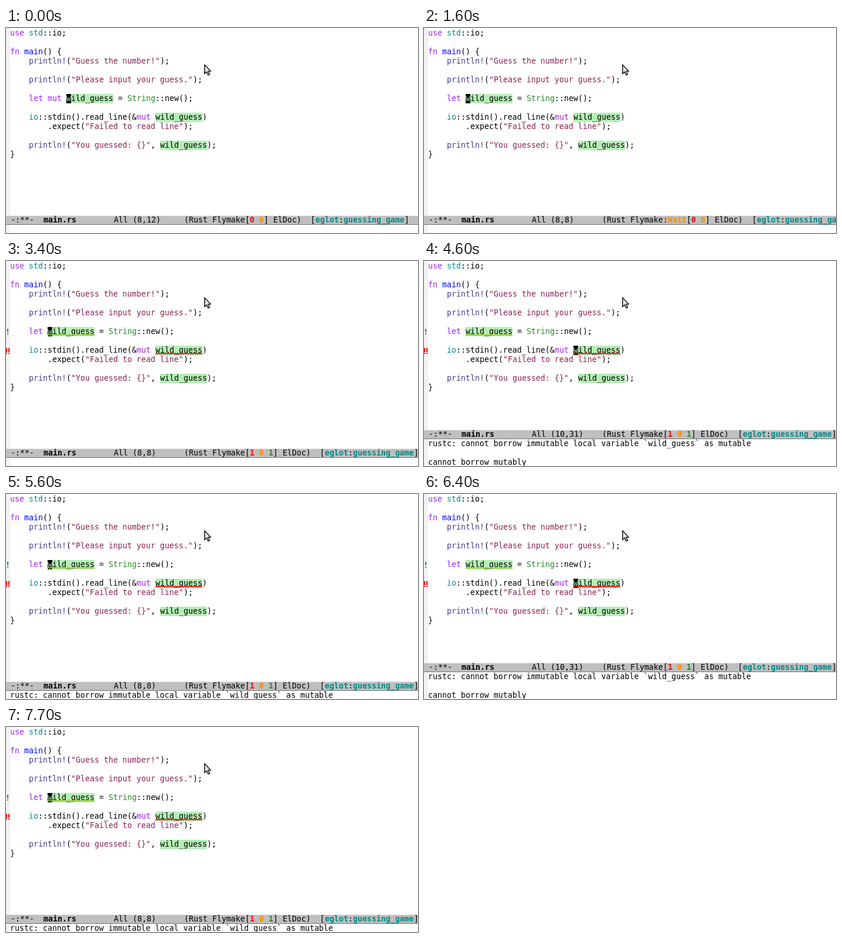
Write an HTML page that moves like this. It is 703x351 px and loops after 8000 ms.

```html
<!DOCTYPE html>
<html lang="en">
<head>
<meta charset="utf-8">
<title>Editor with live diagnostics</title>
<style>
  html, body { margin: 0; width: 100%; height: 100%; overflow: hidden; background: #fff; }
  svg { display: block; width: 703px; height: 351px; }
  text {
    font: 13.288px "DejaVu Sans Mono", "Liberation Mono", monospace;
    font-variant-ligatures: none;
    white-space: pre;
    fill: #000;
  }
  .kw { fill: #a020f0; }
  .const { fill: #008b8b; }
  .fn { fill: #00f; }
  .macro { fill: #483d8b; }
  .str { fill: #8b2252; }
  .type { fill: #228b22; }
  .bold, .err, .warn, .note, .eglot { font-weight: bold; }
  .err { fill: #f00; }
  .warn { fill: #ff8c00; }
  .note { fill: #228b22; }
  .eglot { fill: #008b8b; }
  .cursor { fill: #b4eeb4; }
  .wave { fill: none; stroke-width: 1; shape-rendering: crispEdges; }
</style>
</head>
<body>
<svg id="stage" viewBox="0 0 703 351" xmlns="http://www.w3.org/2000/svg">
  <rect width="703" height="351" fill="#fff"/>
  <rect width="7" height="351" fill="#f2f2f2"/>
  <g id="view"></g>
  <path d="M338.8 62.8V78.4L342.4 75L345 80.6L347.6 79.4L345 74H349.4Z"
        fill="#e6e6e6" stroke="#222" stroke-width="1.6" stroke-linejoin="round"/>
</svg>
<script>
const LOOP = 8000, CELL = 8, ROW = 16, LEFT = 7, TOP = 1;
const VAR = 'wild_guess';
const view = document.getElementById('view');

const colX = col => LEFT + col * CELL;
const rowY = row => TOP + row * ROW;
const esc = s => s.replace(/&/g, '&amp;').replace(/</g, '&lt;');
const rect = (x, y, w, h, fill) =>
  `<rect x="${x}" y="${y}" width="${w}" height="${h}" fill="${fill}"/>`;

const glyphs = (row, col, cls, str) =>
  `<text x="${colX(col)}" y="${rowY(row) + 12}" class="${cls}">${esc(str)}</text>`;

// parts alternate: class, text, class, text...
function line(row, parts) {
  let out = '', col = 0;
  for (let i = 0; i < parts.length; i += 2) {
    const [cls, str] = [parts[i], parts[i + 1]];
    const skip = str.length - str.trimStart().length;
    if (cls === 'hl') out += rect(colX(col), rowY(row), str.length * CELL, ROW, '#b4eeb4');
    if (str.trim()) out += glyphs(row, col + skip, cls, str.trim());
    col += str.length;
  }
  return out;
}

function wave(row, col, color) {
  const y = rowY(row) + 12.5, x = colX(col), end = x + VAR.length * CELL;
  let d = `M${x} ${y + 2}`;
  for (let i = 1; x + i * 2 <= end; i++) d += `L${x + i * 2} ${y + (i % 2 ? 0 : 2)}`;
  return `<path class="wave" d="${d}" stroke="${color}"/>`;
}

const cursor = (row, col) =>
  rect(colX(col), rowY(row), CELL, ROW, '#000') + glyphs(row, col, 'cursor', VAR[0]);

const code = mut => [
  ['kw', 'use', '', ' ', 'const', 'std', '', '::io;'],
  [],
  ['kw', 'fn', '', ' ', 'fn', 'main', '', '() {'],
  ['macro', '    println!', '', '(', 'str', '"Guess the number!"', '', ');'],
  [],
  ['macro', '    println!', '', '(', 'str', '"Please input your guess."', '', ');'],
  [],
  ['kw', mut ? '    let mut ' : '    let ', 'hl', VAR, '', ' = ', 'type', 'String', '', '::new();'],
  [],
  ['const', '    io', '', '::stdin().read_line(&', 'kw', 'mut', '', ' ', 'hl', VAR, '', ')'],
  ['', '        .expect(', 'str', '"Failed to read line"', '', ');'],
  [],
  ['macro', '    println!', '', '(', 'str', '"You guessed: {}"', '', ', ', 'hl', VAR, '', ');'],
  ['', '}']
];

function modeLine(row, pos, wait, counts) {
  const y = rowY(row);
  const tally = ['err', 'warn', 'note'].slice(0, counts.length)
    .flatMap((cls, i) => [cls, String(counts[i]), '', i < counts.length - 1 ? ' ' : '] ElDoc)  [']);
  const label = line(row, [
    '', '-:**-  ', 'bold', 'main.rs', '', '        All ', '', pos.padEnd(11), '', '(Rust Flymake',
    ...(wait ? ['', ':', 'warn', 'Wait'] : []),
    '', '[', ...tally, 'eglot', 'eglot', '', ':', 'eglot', 'guessing_game', '', ']'
  ]);
  return rect(0, y, 703, ROW, '#bfbfbf') +
    rect(0, y, 703, 1, '#e5e5e5') +
    rect(0, y + ROW - 1, 703, 1, '#737373') +
    `<g transform="translate(1)">${label}</g>`;
}

const bang = (x, y, tall, gap, color) =>
  rect(x, y, 2, tall, color) + rect(x, y + tall + gap, 2, 2, color);

const marks = () =>
  bang(2, 116, 6, 2, '#228b22') +
  bang(0, 149, 7, 1, '#f00') + bang(4, 149, 7, 1, '#f00') +
  wave(7, 8, '#9acd32') + wave(9, 31, '#f00');

const ECHO = ['rustc: cannot borrow immutable local variable `wild_guess` as mutable', '', 'cannot borrow mutably'];

const intro = { mut: true, at: [7, 12], counts: [0, 0], echo: 0 };
const edited = { ...intro, mut: false, at: [7, 8] };
const waiting = { ...edited, wait: true };
const flagged = { ...waiting, marks: true };
const checked = { ...flagged, wait: false, counts: [1, 0, 1] };
const onError = { ...checked, at: [9, 31], echo: 3 };
const onNote = { ...checked, echo: 1 };

const steps = [
  [0, intro], [1000, edited], [1600, waiting], [3300, flagged], [3400, checked],
  [4600, onError], [5600, onNote], [6400, onError], [7700, onNote]
];

function draw(s) {
  const [row, col] = s.at;
  const bar = s.echo > 1 ? 18 : 20;
  view.innerHTML =
    code(s.mut).map((parts, i) => line(i, parts)).join('') +
    cursor(row, col) +
    (s.marks ? marks() : '') +
    modeLine(bar, `(${row + 1},${col})`, s.wait, s.counts) +
    ECHO.slice(0, s.echo).map((str, i) => line(bar + 1 + i, ['', str])).join('');
}

let shown;
function tick() {
  const t = performance.now() % LOOP;
  const state = steps.findLast(([at]) => at <= t)[1];
  if (state !== shown) draw(shown = state);
  requestAnimationFrame(tick);
}
tick();
</script>
</body>
</html>
```
